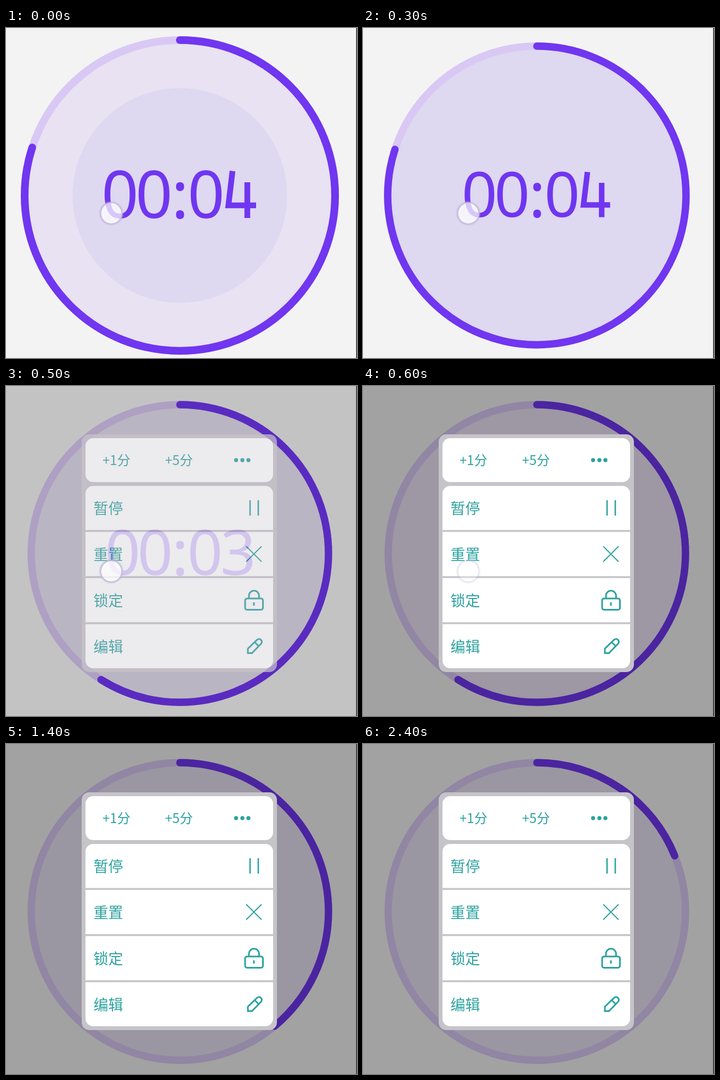
Recreate the animation shown at these times as an HTML page. Size 640 px wide and 601 px high, loop 2600 ms.

```html
<!DOCTYPE html>
<html lang="zh-CN">
<head>
<meta charset="utf-8">
<title>Timer</title>
<style>
  html, body { margin: 0; width: 100%; height: 100%; overflow: hidden; background: #f3f3f3; }
  svg { display: block; width: 640px; height: 601px; }
  .clock { font: 118.5px "Noto Sans", sans-serif; fill: #7036f0; text-anchor: middle; }
  .menu text { font: 27px "Noto Sans CJK SC", "Noto Sans CJK", sans-serif; fill: #2da29f; }
  .menu .add { font-size: 24px; }
  .icons { fill: none; stroke: #2da29f; stroke-width: 3; }
</style>
</head>
<body>
<svg viewBox="0 0 640 601">
  <defs>
    <clipPath id="dial"><circle cx="317" cy="305" r="283"/></clipPath>
    <clipPath id="list"><rect x="145" y="182" width="342" height="332" rx="14"/></clipPath>
  </defs>
  <rect width="640" height="601" fill="#f3f3f3"/>

  <g id="timer">
    <circle cx="317" cy="305" r="283" fill="#e8e2f2"/>
    <circle id="ripple" cx="317" cy="305" fill="#ded8f1" clip-path="url(#dial)"/>
    <circle id="glow" cx="317" cy="305" r="283" fill="#f1e3fb"/>
    <g fill="none" stroke-width="14">
      <circle cx="317" cy="305" r="283" stroke="#d9c8f4"/>
      <circle id="arc" cx="317" cy="305" r="283" stroke="#7036f0" stroke-linecap="round"
              pathLength="1" transform="rotate(-90 317 305)"/>
    </g>
    <g class="clock">
      <text x="208 270 317.5 365" y="346">00:0</text>
      <path id="four" d="M413 260.5 L405.5 323 H456 M440 281 V346" fill="none" stroke="#7036f0" stroke-width="10.5"/>
      <text id="three" x="428" y="346">3</text>
    </g>
  </g>

  <rect id="scrim" width="640" height="601"/>

  <g id="menu" class="menu">
    <rect x="138" y="88" width="356" height="433" rx="14" fill="#c5c4c8"/>
    <rect x="145" y="95" width="342" height="80" rx="14" fill="#fff"/>
    <path clip-path="url(#list)" d="M145 222h342M145 306h342M145 390h342M145 474h342" stroke="#fff" stroke-width="80.5"/>
    <text class="add" x="176" y="144">+1分</text>
    <text class="add" x="290" y="144">+5分</text>
    <text x="159.5" y="233">暂停</text>
    <text x="159.5" y="317">重置</text>
    <text x="159.5" y="401">锁定</text>
    <text x="159.5" y="485">编辑</text>
    <g class="icons">
      <path d="M419.5 135h0M431 135h0M442 135h0" stroke-width="7.4" stroke-linecap="round"/>
      <path d="M445 208v28M460 208v28" stroke-width="2.6"/>
      <path d="M438 292l28 28M466 292l-28 28" stroke-width="1.9"/>
      <rect x="436" y="387" width="32.5" height="20.5" rx="3.5"/>
      <path d="M443 387v-5a9.2 9.2 0 0 1 18.4 0v5M452 394v6"/>
      <path d="M441 486.5V478.5L457.5 462.5Q462 459 465 462.5Q468 466 465 469.5L448.5 486.5ZM454 467l7 7"/>
    </g>
  </g>

  <g id="touch">
    <circle cx="192" cy="337.5" r="21.5" fill="none" stroke="#b9b0d8" stroke-width="2" opacity=".3"/>
    <circle cx="192" cy="337.5" r="19.5" fill="#fff" fill-opacity=".72" stroke="#c5bddc" stroke-width="2.2"/>
  </g>
  <rect x="638.5" width="1.5" height="601" fill="#2a2a2a"/>
</svg>
<script>
const LOOP = 2600, STEP = 100;
const el = id => document.getElementById(id);
const set = (id, attrs) => {
  for (const name in attrs) el(id).setAttribute(name, attrs[name]);
};

// Linear interpolation through [time, value] pairs.
function track(t, ...keys) {
  for (let i = 1; i < keys.length; i++) {
    const [t0, a] = keys[i - 1], [t1, b] = keys[i];
    if (t <= t1) return a + (b - a) * Math.max(0, t - t0) / (t1 - t0);
  }
  return keys[keys.length - 1][1];
}

function render(t) {
  const scale = track(t, [0, 1], [100, .98], [200, .967], [300, .961], [400, .9576]);
  const left = t < 400 ? .8 : t < 1300 ? .589 : t < 2300 ? .39 : .189;
  const ticked = t >= 400;

  set('timer', { transform: `translate(317 305) scale(${scale}) translate(-317 -305)` });
  set('ripple', {
    r: track(t, [0, 195.5], [200, 283]),
    opacity: track(t, [0, .9], [200, 1], [300, 1], [400, .3], [500, 0])
  });
  set('glow', { opacity: track(t, [500, 0], [600, .5], [900, 0]) });
  set('arc', { 'stroke-dasharray': `${left} 1` });
  set('four', { opacity: ticked ? 0 : 1 });
  set('three', { opacity: ticked ? 1 : 0 });
  set('scrim', { opacity: track(t, [300, 0], [400, .097], [500, .2], [600, .335]) });
  set('menu', { opacity: track(t, [300, 0], [400, .33], [500, .73], [600, 1]) });
  set('touch', { opacity: track(t, [500, 1], [600, .4], [800, 0]) });
}

function loop() {
  const t = performance.now() % LOOP;
  render(Math.floor(t / STEP) * STEP);
  requestAnimationFrame(loop);
}
loop();
</script>
</body>
</html>
```
